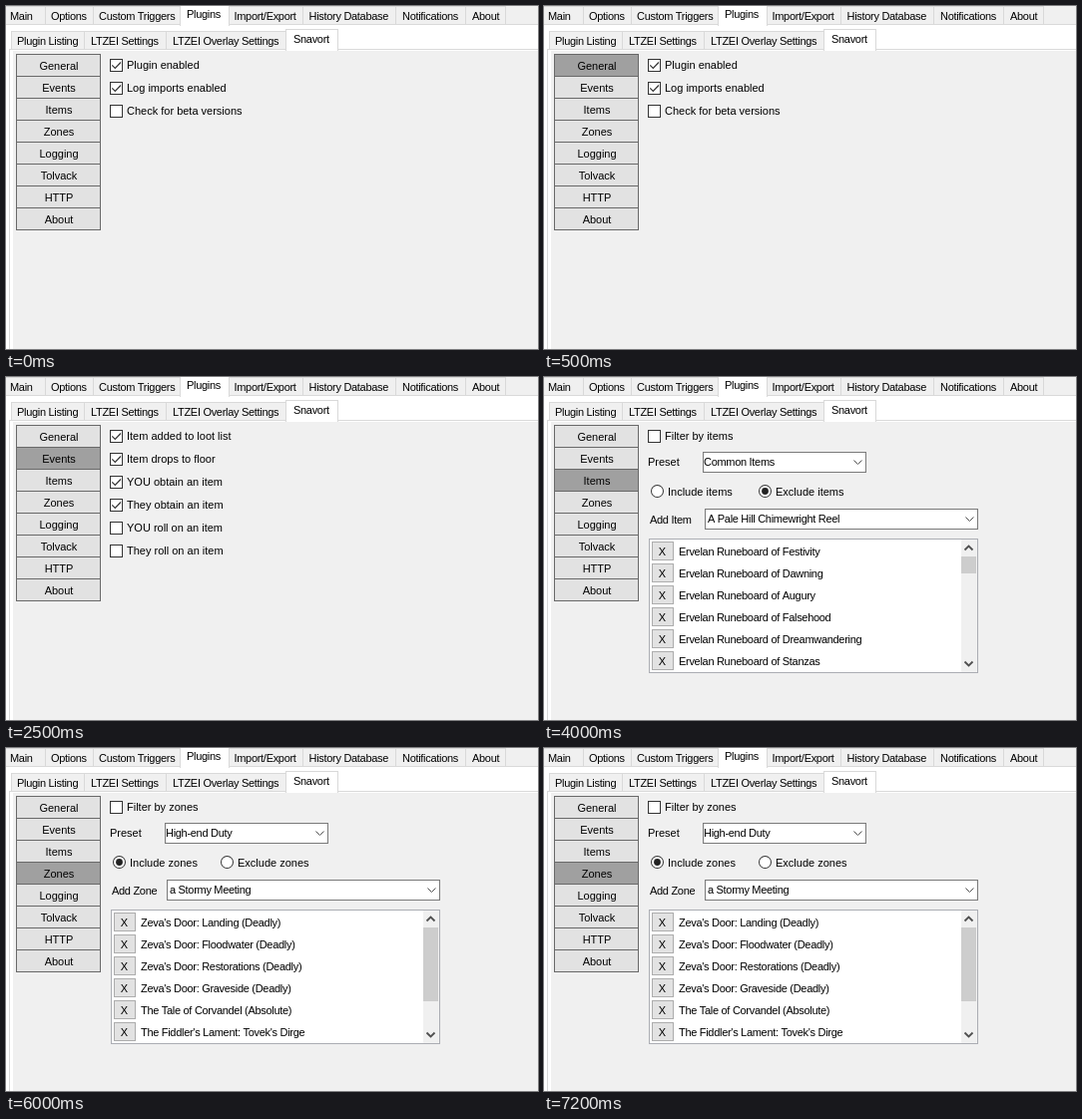
An HTML page with a canvas that plays this animation: 533x344 px, repeating every 8000 ms.

```html
<!DOCTYPE html>
<html lang="en">
<head>
<meta charset="utf-8">
<title>Plugin settings</title>
<style>
  html, body { margin: 0; width: 100%; height: 100%; overflow: hidden; background: #f0f0f0; }
  canvas { display: block; width: 533px; height: 344px; }
</style>
</head>
<body>
<canvas id="stage" width="533" height="344"></canvas>
<script>
const ctx = document.getElementById('stage').getContext('2d');
const LOOP = 8000;
const STARTS = [0, 500, 2500, 4000, 6000];
const GRAY = '#f0f0f0', WHITE = '#fff', LINE = '#d9d9d9', INK = '#000', DARK = '#333';
const BUTTON = '#e2e2e2';
const TIGHT = '-0.3px';

const MENU = ['General', 'Events', 'Items', 'Zones', 'Logging', 'Tolvack', 'HTTP', 'About'];
const OUTER_TABS = [
  [-1, 39, 'Main', 4], [39, 87, 'Options', 45], [87, 175, 'Custom Triggers', 93],
  [222, 297, 'Import/Export', 228.5], [297, 390, 'History Database', 303.5],
  [390, 460, 'Notifications', 397], [460, 500, 'About', 467], [174, 223, 'Plugins', 181]
];
const INNER_TABS = [
  [5, 78, 'Plugin Listing', 11], [78, 160, 'LTZEI Settings', 85],
  [160, 281, 'LTZEI Overlay Settings', 167], [280, 332, 'Snavort', 288]
];
const GENERAL = [['Plugin enabled', 1], ['Log imports enabled', 1], ['Check for beta versions', 0]];
const EVENTS = [
  ['Item added to loot list', 1], ['Item drops to floor', 1], ['YOU obtain an item', 1],
  ['They obtain an item', 1], ['YOU roll on an item', 0], ['They roll on an item', 0]
];
const ITEMS = {
  noun: 'items', label: 'Add Item', preset: 'Common Items', exclude: true,
  pick: 'A Pale Hill Chimewright Reel', thumb: 17,
  rows: ['Festivity', 'Dawning', 'Augury', 'Falsehood', 'Dreamwandering', 'Stanzas']
    .map(s => 'Ervelan Runeboard of ' + s)
};
const ZONES = {
  noun: 'zones', label: 'Add Zone', preset: 'High-end Duty', exclude: false,
  pick: 'a Stormy Meeting', thumb: 74,
  rows: ['Landing', 'Floodwater', 'Restorations', 'Graveside']
    .map(s => `Zeva's Door: ${s} (Deadly)`)
    .concat('The Tale of Corvandel (Absolute)', "The Fiddler's Lament: Tovek's Dirge")
};

function fill(x, y, w, h, color) {
  ctx.fillStyle = color;
  ctx.fillRect(x, y, w, h);
}

function box(x, y, w, h, color, edge) {
  fill(x, y, w, h, edge);
  fill(x + 1, y + 1, w - 2, h - 2, color);
}

function text(str, x, y, spacing = '0px', align = 'left') {
  ctx.font = '11px "Liberation Sans", Arial, sans-serif';
  ctx.letterSpacing = spacing;
  ctx.textAlign = align;
  ctx.fillStyle = INK;
  ctx.fillText(str, x, y);
}

function polyline(points, color, width) {
  ctx.beginPath();
  points.forEach(([x, y]) => ctx.lineTo(x, y));
  ctx.strokeStyle = color;
  ctx.lineWidth = width;
  ctx.stroke();
}

// dir: 1 points down, -1 points up
function chevron(x, y, dir, width) {
  polyline([[x - 4, y - 2 * dir], [x, y + 2 * dir], [x + 4, y - 2 * dir]], '#505050', width);
}

// The last tab in the list is the selected one
function tabRow(tabs, top, x0) {
  fill(x0, top + 18, 533 - x0, 1, LINE);
  tabs.forEach(([left, right, name, tx], i) => {
    const active = i === tabs.length - 1;
    const y = active ? top - 2 : top;
    box(left, y, right - left + 1, active ? 22 : 19, active ? WHITE : GRAY, LINE);
    if (active) fill(left + 1, top + 17, right - left - 1, 3, WHITE);
    text(name, tx, top + (active ? 12 : 14), TIGHT);
  });
}

function frameWindow() {
  fill(0, 0, 533, 344, GRAY);
  fill(0, 18, 533, 326, WHITE);
  tabRow(OUTER_TABS, 0, 0);
  fill(3, 43, 1, 301, LINE);
  fill(7, 45, 526, 299, GRAY);
  tabRow(INNER_TABS, 25, 3);
}

function menu(selected) {
  MENU.forEach((name, i) => {
    const y = 48 + 22 * i;
    box(10, y, 85, 23, i === selected ? '#a0a0a0' : BUTTON, '#696969');
    text(name, 53, y + 16, '0px', 'center');
  });
}

function checkbox(label, on, row) {
  const y = 53 + 23 * row;
  box(104, y, 13, 13, WHITE, DARK);
  if (on) polyline([[106.3, y + 6.3], [109.3, y + 9.3], [115, y + 3.5]], DARK, 1.2);
  text(label, 121, y + 10);
}

function radio(label, x, on) {
  const disc = (r, color) => {
    ctx.beginPath();
    ctx.arc(x, 114.5, r, 0, 7);
    ctx.fillStyle = color;
    ctx.fill();
  };
  disc(6.5, DARK);
  disc(5.5, WHITE);
  if (on) disc(3.4, '#222');
  text(label, x + 10.5, 119);
}

function combo(x, y, right, value, tx) {
  box(x, y, right - x, 21, WHITE, '#7a7a7a');
  text(value, tx, y + 14, TIGHT);
  chevron(right - 8.5, y + 10.5, 1, 1);
}

function list({ rows, thumb }) {
  box(105, 162, 330, 135, WHITE, '#abadb3');
  rows.forEach((name, i) => {
    const y = 165 + 22 * i;
    box(108, y, 22, 19, BUTTON, '#adadad');
    text('X', 118.5, y + 14, '0px', 'center');
    text(name, 135, y + 14, TIGHT);
  });
  fill(418, 163, 16, 133, GRAY);
  fill(418, 180, 15, thumb, '#cdcdcd');
  chevron(425.5, 171.5, -1, 1.8);
  chevron(425.5, 287.5, 1, 1.8);
}

function filterPage(page) {
  checkbox('Filter by ' + page.noun, false, 0);
  text('Preset', 104, 89);
  combo(159, 75, 323, page.preset, 160);
  radio('Include ' + page.noun, 113.5, !page.exclude);
  radio('Exclude ' + page.noun, 221.5, page.exclude);
  text(page.label, 106, 147, TIGHT);
  combo(161, 132, 435, page.pick, 164);
  list(page);
}

const checks = rows => rows.forEach(([label, on], i) => checkbox(label, on, i));
const PAGES = [
  () => checks(GENERAL),
  () => checks(EVENTS),
  () => filterPage(ITEMS),
  () => filterPage(ZONES)
];

function render(now) {
  const t = now % LOOP;
  const step = STARTS.filter(s => s <= t).length - 1;
  frameWindow();
  menu(step - 1);
  PAGES[Math.max(0, step - 1)]();
}

const begin = performance.now();
function tick() {
  render(performance.now() - begin);
  requestAnimationFrame(tick);
}
tick();
</script>
</body>
</html>
```
